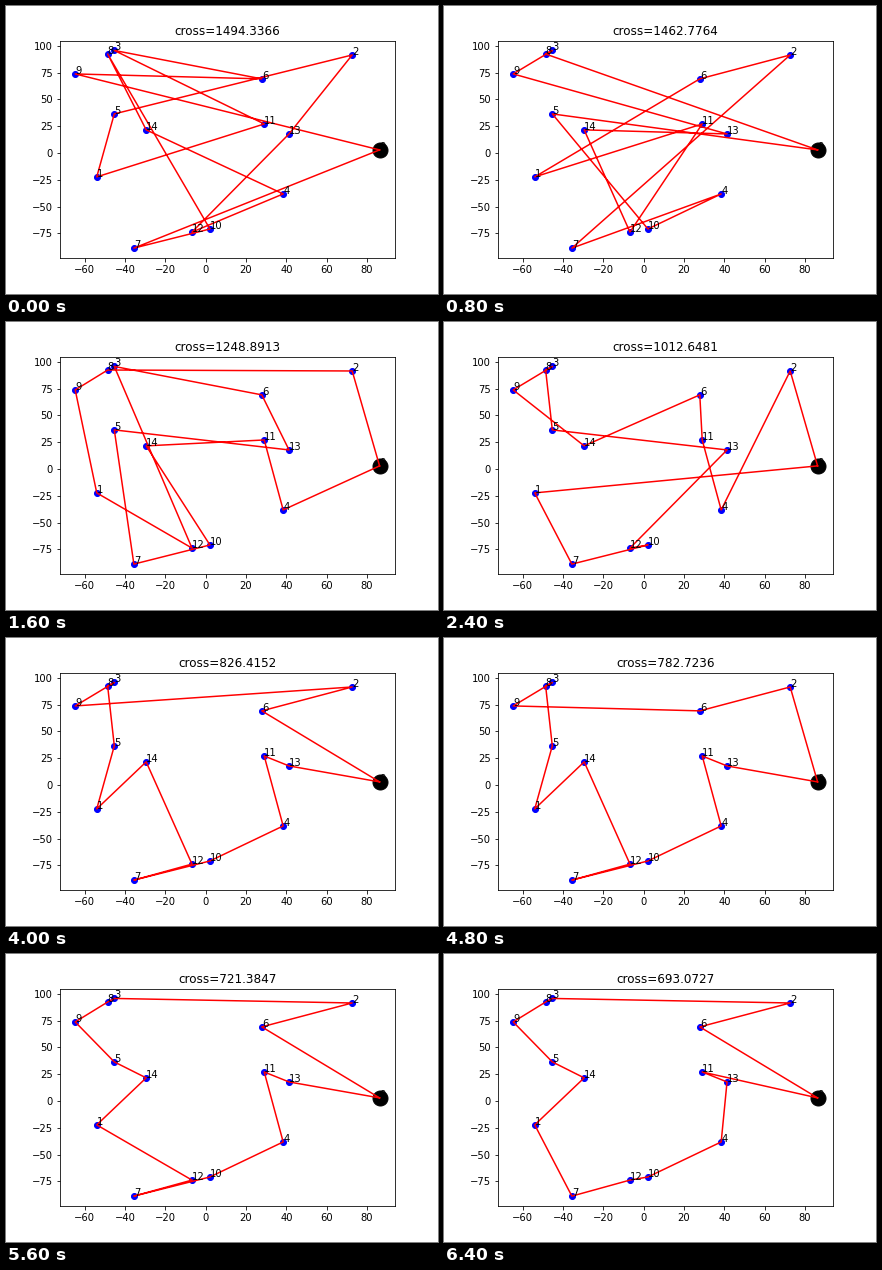
These frames come from a looping animation (432 by 288 pixels, 8000 ms). A matplotlib script:

```python
import matplotlib.pyplot as plt
import numpy as np
from matplotlib.animation import FuncAnimation

CITIES = np.array([
    (86.18, 2.9), (-54.0, -22.3), (72.6, 91.5), (-45.3, 95.73), (38.4, -38.2),
    (-45.3, 36.5), (27.8, 69.2), (-35.6, -88.77), (-48.6, 92.4), (-64.67, 73.8),
    (2.1, -70.9), (29.0, 27.1), (-6.8, -73.8), (41.3, 17.8), (-29.5, 21.6),
])

# Tour length and how the tour arises: a fresh order of cities after the depot,
# or pairs "a-b" of cities that trade places in the previous tour
GENERATIONS = [
    (1494.3366, "9 6 3 11 1 5 2 13 12 4 14 8 10 7"),
    (1462.7764, "8 3 9 13 14 12 11 1 6 2 7 4 10 5"),
    (1248.8913, "2 8 9 1 12 3 6 13 5 7 10 14 11 4"),
    (1012.6481, "1 7 10 12 13 5 8 3 9 14 6 11 4 2"),
    (885.7307, "4-13"),
    (826.4152, "6 2 9 3 8 5 1 14 12 7 10 4 11 13"),
    (782.7236, "2-6"),
    (721.3847, "2-6 9-3 9-8 1-14"),
    (693.0727, "7-12 11-13"),
]
FRAMES = 10
STEP_MS = 800


def evolve(tour, change):
    if "-" not in change:
        return [int(city) for city in change.split()]
    tour = list(tour)
    for pair in change.split():
        i, j = (tour.index(int(city)) for city in pair.split("-"))
        tour[i], tour[j] = tour[j], tour[i]
    return tour


tours = []
for _, change in GENERATIONS:
    tours.append(evolve(tours[-1] if tours else [], change))

fig, ax = plt.subplots(figsize=(6, 4), dpi=72, facecolor="white")
fig.subplots_adjust(left=0.125, right=0.9, bottom=0.125, top=0.88)

ax.scatter(*CITIES.T, s=36, c="b")
ax.scatter(*CITIES[0], s=225, c="k")
for number, (x, y) in enumerate(CITIES):
    ax.text(x, y, str(number), fontsize=10)

route, = ax.plot([], [], "r", lw=1.5)
title = ax.set_title("", fontsize=12)


def draw(frame):
    generation = min(frame, len(tours) - 1)
    route.set_data(*CITIES[[0, *tours[generation], 0]].T)
    title.set_text(f"cross={GENERATIONS[generation][0]:.4f}")
    return route, title


anim = FuncAnimation(fig, draw, frames=FRAMES, interval=STEP_MS, repeat=True)
plt.show()
```
